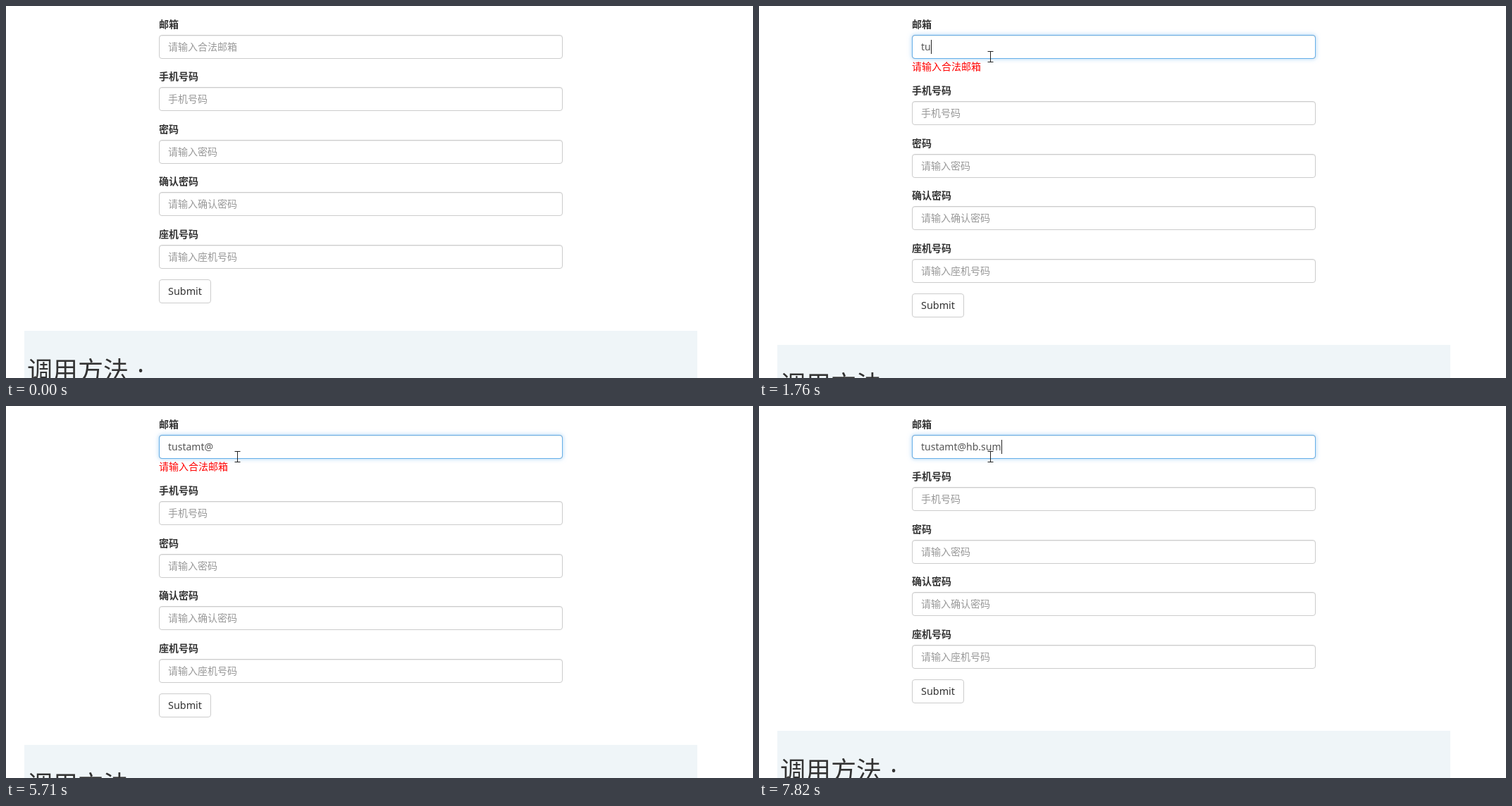
These frames come from a looping animation (1060 px wide and 528 px high, 8 s). An HTML page:

```html
<!DOCTYPE html>
<html lang="zh-CN">
<head>
<meta charset="utf-8">
<title>Form validation</title>
<style>
html, body { margin: 0; width: 100%; height: 100%; overflow: hidden; background: #fff; }
#stage {
  position: relative; width: 1060px; height: 528px; overflow: hidden;
  font: 14px/20px "Noto Sans", "Noto Sans CJK SC", "Noto Sans CJK", sans-serif; color: #333;
}
#stage div, #stage svg { position: absolute; white-space: pre; box-sizing: border-box; }
#lower { left: 0; top: 0; width: 1060px; height: 600px; }
#stage .label { left: 217px; font-weight: 700; }
#stage .input {
  left: 217px; width: 573px; height: 34px; padding: 6px 12px;
  border: 1px solid #ccc; border-radius: 4px; background: #fff; color: #999;
  box-shadow: inset 0 1px 1px rgba(0,0,0,.075);
}
#glow {
  left: -1px; top: -1px; width: 573px; height: 34px; border: 1px solid #66afe9; border-radius: 4px;
  box-shadow: 0 0 6px rgba(102,175,233,.55);
}
#typed { color: #555; }
#caret { display: inline-block; width: 1px; height: 20px; margin-right: -1px; vertical-align: top; background: #222; }
#error { left: 217px; top: 76px; color: #f00; }
#button {
  left: 217px; top: 388px; width: 74px; height: 34px; line-height: 32px; font-size: 14.4px;
  text-align: center; border: 1px solid #ccc; border-radius: 4px;
}
#band { left: 26px; top: 461px; width: 955px; height: 140px; background: #eff5f8; }
#band div { left: 4px; top: 37px; font-size: 36px; line-height: 40px; }
#band span { position: relative; left: -1px; top: 4px; display: inline-block; width: 36px; text-align: center; }
#cursor { left: 0; top: 0; overflow: visible; }
</style>
</head>
<body>
<div id="stage">
  <div id="lower">
    <div id="button">Submit</div>
    <div id="band"><div>调用方法<span>:</span></div></div>
  </div>
  <div id="error">请输入合法邮箱</div>
  <svg id="cursor" width="1" height="1">
    <path id="arrow" d="M.5 .5V16L4 12.7 6.4 18.4 8.8 17.4 6.4 11.8H11.4Z" fill="#fff" stroke="#000"/>
    <path id="beam" d="M-4 -7.5H4M0 -7.5V7.5M-4 7.5H4" fill="none" stroke="#222"/>
  </svg>
</div>
<script>
const LOOP = 8000, ROW = 74.5, FIRST = 41;
const MOVE_START = 170, MOVE_STEPS = 10, MOVE_STEP = 78;
const FOCUS = 985, FADE = 135, BLINK = 512;

const fields = [
  ['邮箱', '请输入合法邮箱'], ['手机号码', '手机号码'], ['密码', '请输入密码'],
  ['确认密码', '请输入确认密码'], ['座机号码', '请输入座机号码'],
];
const keys = [
  [1760, 'tu'], [2210, 's'], [2610, 'ta'], [2760, 'mt'], [4170, '@'], [6040, 'h'],
  [6180, 'b'], [7130, '.'], [7590, 's'], [7740, 'u'], [7820, 'm'],
];

const $ = id => document.getElementById(id);
const show = (node, on) => { node.style.visibility = on ? 'visible' : 'hidden'; };
const clamp = v => Math.max(0, Math.min(1, v));

function addBox(parent, className, top, text) {
  const box = document.createElement('div');
  box.className = className;
  box.style.top = top + 'px';
  box.textContent = text;
  parent.appendChild(box);
  return box;
}

const inputs = fields.map(([label, hint], i) => {
  const top = Math.floor(FIRST + ROW * i);
  const parent = i ? $('lower') : $('stage');
  addBox(parent, 'label', top - 25, label);
  return addBox(parent, 'input', top, hint);
});
inputs[0].innerHTML =
  '<div id="glow"></div><span id="typed"></span><span id="caret"></span><span id="hint"></span>';
$('hint').textContent = fields[0][1];
$('stage').appendChild($('cursor'));

const bezier = (u, a, b, c, d) => {
  const v = 1 - u;
  return v * v * v * a + 3 * u * v * v * b + 3 * u * u * v * c + u * u * u * d;
};
const overInput = (x, y) => x >= 217 && x < 790 && y >= FIRST && (y - FIRST) % ROW < 34;

// The pointer sweeps in from the lower right, overshoots and settles in the first input.
function movePointer(t) {
  const u = clamp(Math.floor((t - MOVE_START) / MOVE_STEP) / MOVE_STEPS);
  const x = Math.round(bezier(u, 900, 200, 95, 328));
  const y = Math.round(bezier(u, 482, 120, -98, 72));
  const beam = overInput(x, y), present = t >= MOVE_START;
  $('cursor').style.transform = `translate(${x + (beam ? .5 : 0)}px, ${y}px)`;
  show($('beam'), present && beam);
  show($('arrow'), present && !beam);
}

function render(t) {
  const pressed = keys.filter(([time]) => time <= t);
  const text = pressed.map(([, letters]) => letters).join('');
  const lastInput = pressed.length ? pressed[pressed.length - 1][0] : FOCUS;
  const invalid = text !== '' && !/@\w+\.\w{2,}$/.test(text);

  $('typed').textContent = text;
  $('hint').style.display = text ? 'none' : '';
  show($('caret'), t >= FOCUS && Math.floor((t - lastInput) / BLINK) % 2 === 0);
  $('glow').style.opacity = clamp((t - FOCUS) / FADE);
  show($('error'), invalid);
  $('lower').style.top = (invalid ? 20 : 0) + 'px';
  movePointer(t);
}

const start = performance.now();
function tick() {
  render((performance.now() - start) % LOOP);
  requestAnimationFrame(tick);
}
tick();
</script>
</body>
</html>
```
